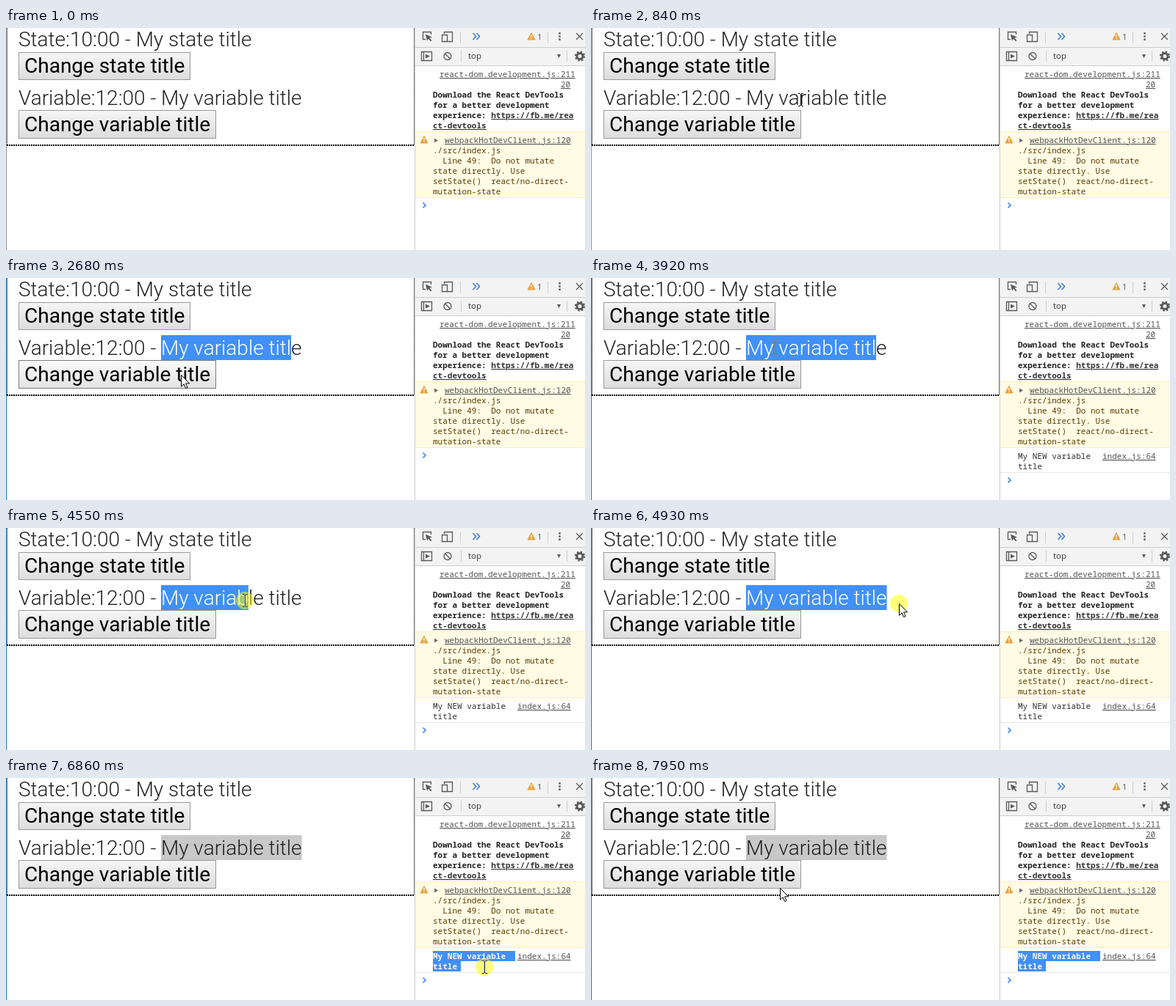
An HTML page that plays this animation: 788x303 px, repeating every 8000 ms.

```html
<!DOCTYPE html>
<html lang="en">
<head>
<meta charset="utf-8">
<title>State and variable titles</title>
<style>
  html, body { margin: 0; width: 100%; height: 100%; overflow: hidden; background: #fff; }
  svg { display: block; width: 788px; height: 303px; }
  text { white-space: pre; }
  .big { font: 300 28px Roboto, sans-serif; fill: #222; }
  .label { font: 400 28px Roboto, sans-serif; fill: #000; }
  .mono { font: 11px "Noto Sans Mono", monospace; fill: #303030; }
  .bold { font-weight: 700; fill: #222; }
  .warn { fill: #5c3c00; }
  .link { text-decoration: underline; fill: #545454; }
  .bold .link { fill: #333; }
  .icon { fill: none; stroke: #5a5a5a; stroke-width: 1.3; }
  .rule { fill: none; stroke: #ccc; }
  .dots { fill: none; stroke: #000; }
  .btn { fill: url(#face); stroke: #999; }
  .btn.hover { fill: url(#faceHover); stroke: #7c7c7c; }
  .btn.down { fill: url(#faceDown); stroke: #7c7c7c; }
  #beam { fill: none; stroke: #fff; mix-blend-mode: difference; }
</style>
</head>
<body>
<svg viewBox="0 0 788 303">
  <defs>
    <linearGradient id="face" x2="0" y2="1"><stop stop-color="#f6f6f6"/><stop offset="1" stop-color="#dcdcdc"/></linearGradient>
    <linearGradient id="faceHover" x2="0" y2="1"><stop stop-color="#fafafa"/><stop offset="1" stop-color="#e2e2e2"/></linearGradient>
    <linearGradient id="faceDown" x2="0" y2="1"><stop stop-color="#d4d4d4"/><stop offset="1" stop-color="#e8e8e8"/></linearGradient>
    <clipPath id="pageClip"><rect id="pageClipBox" x="211" y="78" height="34"/></clipPath>
    <clipPath id="logClip"><rect id="logClip1" x="581" y="236" height="14"/><rect id="logClip2" x="581" y="250" height="14"/></clipPath>
  </defs>
  <rect width="788" height="303" fill="#fff"/>

  <!-- page -->
  <path id="edge" d="M.5 0V303"/>
  <path class="dots" d="M1.5 0V160M555.5 0V160" stroke-dasharray="1 1"/>
  <path class="dots" d="M1 160H556" stroke-width="2" stroke-dasharray="2 1"/>
  <text class="big" x="17" y="25">State:10:00 - My state title</text>
  <text class="big" x="17" y="105">Variable:12:00 - </text>
  <text class="big" x="211" y="105" id="title">My variable title</text>
  <rect id="pageSel" x="211" y="78" height="34"/>
  <text class="big" x="211" y="105" id="titleSel" clip-path="url(#pageClip)">My variable title</text>
  <rect class="btn" x="17.5" y="33.5" width="233" height="37"/>
  <text class="label" x="25" y="61">Change state title</text>
  <rect class="btn" id="btn" x="17.5" y="112.5" width="268" height="38"/>
  <text class="label" x="25" y="141">Change variable title</text>

  <!-- tool bars -->
  <rect x="557" width="231" height="52" fill="#f3f3f3"/>
  <path class="rule" d="M556.5 0V303M557 26.5H788M557 51.5H788M618.5 5V21M737.5 5V21M619.5 31V46M763.5 31V46"/>
  <path class="icon" d="M571 15.5H567.5V5.500H578.500V9"/>
  <path d="M571 8.500L580 12.500L576.500 13.500L579.500 17L578 18.300L575 14.800L573 17.500Z" fill="#5a5a5a"/>
  <path class="icon" d="M596.500 8V5.500H607.500V18.500H601M593.500 9.500H600.500V18.500H593.500Z"/>
  <path d="M635.500 7L639.500 11.500L635.500 16M640.500 7L644.500 11.500L640.500 16" fill="none" stroke="#3f7de0" stroke-width="1.6"/>
  <g id="tri"><path d="M715 6.500L720 16H710Z" fill="#e8a33d" stroke="#e8a33d" stroke-linejoin="round"/><path d="M715 9V12.700M715 13.700V15" stroke="#fff" stroke-width="1.3"/></g>
  <text x="723" y="16" font-family="Open Sans, sans-serif" font-size="11.500" fill="#5a5a5a">1</text>
  <path d="M753.500 6V17" stroke="#5a5a5a" stroke-width="2.400" stroke-dasharray="2.400 1.900"/>
  <path class="icon" d="M776 7L785 16M785 7L776 16"/>
  <path class="icon" d="M565.500 32.500H579.500V44.500H565.500ZM568.500 33V44"/>
  <path d="M571 35.500L577 38.500L571 41.500Z" fill="#5a5a5a"/>
  <circle class="icon" cx="601" cy="38.500" r="5"/>
  <path class="icon" d="M597.500 35L604.500 42"/>
  <text x="629" y="42" font-family="Open Sans, sans-serif" font-size="11.500" fill="#333">top</text>
  <path d="M750 36H755L752.500 41Z" fill="#5a5a5a"/>
  <circle cx="781" cy="38.500" r="4" fill="none" stroke="#5a5a5a" stroke-width="3"/>
  <circle cx="781" cy="38.500" r="6" fill="none" stroke="#5a5a5a" stroke-width="2.200" stroke-dasharray="2.360 2.350"/>

  <!-- console -->
  <text class="mono link" x="590" y="67">react-dom.development.js:211</text>
  <text class="mono link" x="755" y="81">20</text>
  <g class="mono bold">
    <text x="581" y="95">Download the React DevTools</text>
    <text x="581" y="109">for a better development</text>
    <text x="581" y="123">experience: <tspan class="link">https://fb.me/rea</tspan></text>
    <text class="link" x="581" y="137">ct-devtools</text>
  </g>
  <rect x="557" y="142" width="231" height="89" fill="#fffbe5"/>
  <path d="M557 141.500H788M557 231.500H788" stroke="#fff0b5"/>
  <use href="#tri" x="-146" y="141"/>
  <path d="M583 150.500L588 153.500L583 156.500Z" fill="#6e6e6e"/>
  <text class="mono link" x="597" y="157">webpackHotDevClient.js:120</text>
  <g class="mono warn">
    <text x="581" y="171">./src/index.js</text>
    <text x="581" y="185">  Line 49:  Do not mutate</text>
    <text x="581" y="199">state directly. Use</text>
    <text x="581" y="213">setState()  react/no-direct-</text>
    <text x="581" y="227">mutation-state</text>
  </g>
  <g id="log" class="mono">
    <rect id="logSel1" x="581" y="236" height="14" fill="#4090f7"/>
    <rect id="logSel2" x="581" y="250" height="14" fill="#4090f7"/>
    <g id="logText"><text x="581" y="247">My NEW variable</text><text x="581" y="261">title</text></g>
    <use href="#logText" clip-path="url(#logClip)" fill="#fff" style="font-weight:700" id="logWhite"/>
    <text class="link" x="696" y="247">index.js:64</text>
    <path d="M557 265.500H788" stroke="#e8e8e8"/>
  </g>
  <path id="prompt" d="M567.500 238.500L571 242L567.500 245.500" fill="none" stroke="#3f87e8" stroke-width="1.700"/>

  <!-- pointer -->
  <circle id="halo" r="12" fill="#ff0" fill-opacity=".52"/>
  <path id="arrow" d="M.5 .5V16.300L4.200 12.800L6.700 18.600L9.100 17.600L6.600 11.900H11.700Z" fill="#fff" stroke="#000"/>
  <path id="beam" d="M-3 -8.500H-1L.5 -7.500L2 -8.500H4M.5 -7.500V7.500M-3 8.500H-1L.5 7.500L2 8.500H4"/>
</svg>
<script>
const LOOP = 8000, FIRST = 140, STEP = 77.3, CHAR = 6.6;
const $ = id => document.getElementById(id);
const show = (id, on) => $(id).setAttribute('visibility', on ? 'visible' : 'hidden');
const width = (ids, w) => ids.forEach(id => $(id).setAttribute('width', Math.max(0, w)));
const within = (t, a, b) => t >= a && t < b;

// time, x, y of the pointer
const path = [
  [140, 426, 255], [450, 402, 175], [700, 330, 108], [920, 257, 92],
  [1140, 217, 95], [1225, 217, 95], [1530, 327, 96], [1760, 388, 99],
  [2230, 388, 99], [2520, 262, 137], [2680, 221, 128], [3620, 221, 128],
  [3920, 253, 95], [4000, 217, 95], [4110, 217, 95], [4925, 419, 103],
  [5640, 419, 103], [5960, 505, 243], [6100, 552, 267], [6240, 581, 244],
  [6400, 581, 244], [7010, 673, 262], [7500, 673, 262], [7940, 257, 150]
];
const presses = [[1130, 1820], [3140, 3290], [3980, 5690], [6380, 7550]];

function pointer(t) {
  const i = path.findIndex(p => p[0] > t);
  if (i < 1) return path[i < 0 ? path.length - 1 : 0].slice(1);
  const [a, b] = [path[i - 1], path[i]], u = (t - a[0]) / (b[0] - a[0]);
  return [a[1] + (b[1] - a[1]) * u, a[2] + (b[2] - a[2]) * u];
}

// nearest letter boundary in the variable title
function snap(x) {
  const text = $('title');
  let best = 211;
  for (let i = 0; i < text.getNumberOfChars(); i++) {
    const end = text.getEndPositionOfChar(i).x;
    if (Math.abs(end - x) < Math.abs(best - x)) best = end;
  }
  return best;
}

function pageSelection(t) {
  if (t < 1130 || within(t, 3980, 4090)) return 0;
  const [x] = pointer(t < 3980 ? Math.min(t, 1800) : Math.min(t, 5000));
  return snap(x) - 211;
}

function logSelection(t) {
  if (t < 6380) return [0, 0];
  const [x, y] = pointer(Math.min(t, 7100));
  const cells = n => Math.min(n, Math.round((x - 581) / CHAR)) * CHAR;
  return y < 250 ? [cells(15), 0] : [112, Math.min(38, cells(5) + 5)];
}

function draw(now) {
  const time = now % LOOP;
  const t = time < FIRST - 8 ? 0 : FIRST + STEP * Math.floor((time - FIRST + 8) / STEP);
  const [x, y] = pointer(t);
  const shown = t >= 130, logged = t >= 3210, blurred = t >= 6380;

  $('edge').setAttribute('stroke', t < 970 ? '#999' : '#1883d7');
  width(['pageSel', 'pageClipBox'], pageSelection(t));
  $('pageSel').setAttribute('fill', blurred ? '#c8c8c8' : '#4090f7');
  $('titleSel').style.fill = blurred ? '#222' : '#fff';

  const hover = shown && x > 17 && x < 286 && y > 112 && y < 149;
  $('btn').setAttribute('class', 'btn' + (within(t, 3140, 3210) ? ' down' : hover ? ' hover' : ''));

  $('log').style.display = logged ? '' : 'none';
  $('prompt').setAttribute('transform', `translate(0 ${logged ? 34 : 0})`);
  const [first, second] = logSelection(t);
  width(['logSel1', 'logClip1'], first);
  width(['logSel2', 'logClip2'], second);

  const onTitle = x > 17 && x < 402 && y > 78 && y < 112;
  const onLog = x > 582 && y > 235 && y < 265;
  const beam = onTitle || onLog;
  const spot = `translate(${Math.round(x)} ${Math.round(y)})`;
  ['halo', 'arrow', 'beam'].forEach(id => $(id).setAttribute('transform', spot));
  show('halo', presses.some(([a, b]) => within(t, a, b)));
  show('arrow', shown && !beam);
  show('beam', shown && beam);
}

let start;
function tick(now) {
  start ??= now;
  draw(now - start);
  requestAnimationFrame(tick);
}
draw(0);
requestAnimationFrame(tick);
</script>
</body>
</html>
```
